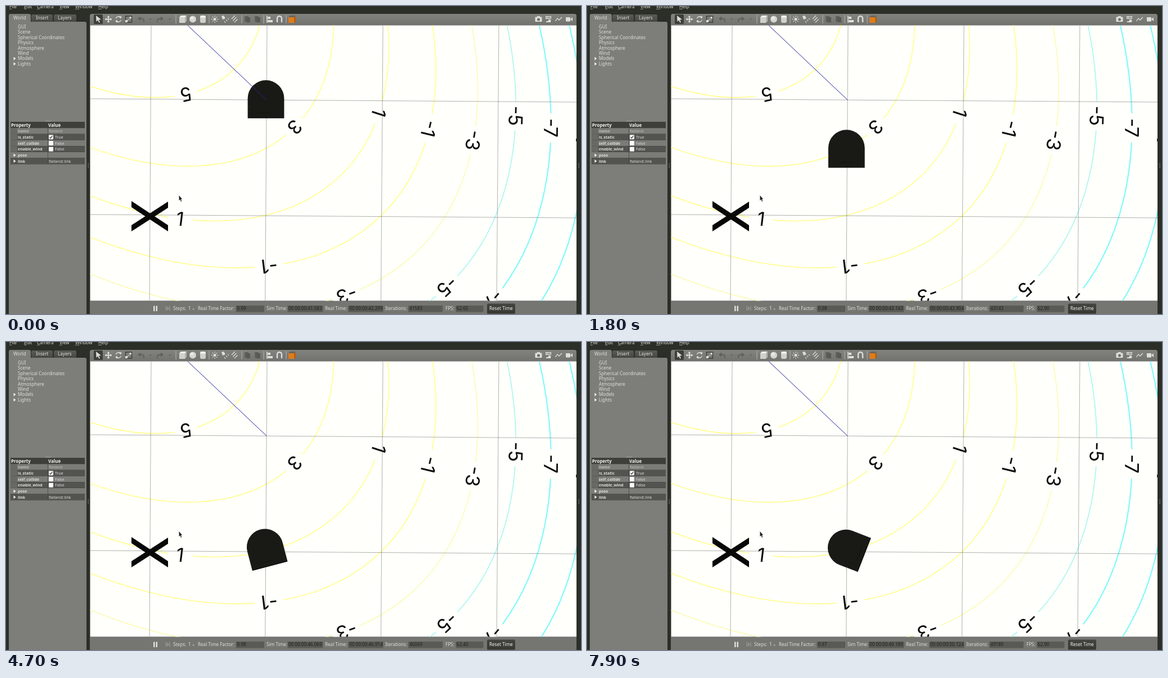
These frames come from a looping animation (1022 px wide and 548 px high, 8 s). An HTML page with a canvas:

```html
<!DOCTYPE html>
<html>
<head>
<meta charset="utf-8">
<style>
html, body { margin: 0; width: 100%; height: 100%; overflow: hidden; background: #2c2e28; }
canvas { display: block; }
</style>
</head>
<body>
<canvas id="stage" width="1022" height="548"></canvas>
<script>
const W = 1022, H = 548;
const screen = document.getElementById('stage').getContext('2d');
const backdrop = document.createElement('canvas');
backdrop.width = W;
backdrop.height = H;
let g = backdrop.getContext('2d');

const DARK = '#2c2e28', LIGHT = '#dededa', DIM = '#5f5f5b', GROUND = '#fffffb';

function rect(x, y, w, h, color, radius = 0) {
  g.fillStyle = color;
  g.beginPath();
  g.roundRect(x, y, w, h, radius);
  g.fill();
}

// Text is placed by its vertical middle.
function text(str, x, y, color = LIGHT, size = 8.1, weight = 400, family = 'Noto Sans') {
  g.font = `${weight} ${size}px "${family}", sans-serif`;
  g.fillStyle = color;
  g.fillText(str, x, y + size * 0.36);
}

function trace(points) {
  g.beginPath();
  for (let i = 0; i < points.length; i += 2) g.lineTo(points[i], points[i + 1]);
}

function line(points, color, width = 1) {
  g.strokeStyle = color;
  g.lineWidth = width;
  trace(points);
  g.stroke();
}

function poly(points, color) {
  g.fillStyle = color;
  trace(points);
  g.fill();
}

function circle(x, y, r, color) {
  g.fillStyle = color;
  g.beginPath();
  g.arc(x, y, r, 0, Math.PI * 2);
  g.fill();
}

function fade(y0, y1, top, bottom) {
  const grad = g.createLinearGradient(0, y0, 0, y1);
  grad.addColorStop(0, top);
  grad.addColorStop(1, bottom);
  return grad;
}

function turned(x, y, angle, draw) {
  g.save();
  g.translate(x, y);
  g.rotate(angle);
  draw();
  g.restore();
}

function drawMenuAndTabs() {
  rect(0, 0, W, H, DARK);
  [['File', 6], ['Edit', 32], ['Camera', 55], ['View', 95], ['Window', 123], ['Help', 164]].forEach(([name, x]) => {
    text(name, x, 1);
    rect(x, 5, g.measureText(name[0]).width, 0.7, '#bdbdb8');
  });
  rect(45, 15, 38, 13, fade(15, 28, '#5b5b57', '#454541'), [3, 3, 0, 0]);
  rect(85, 15, 40, 13, fade(15, 28, '#5b5b57', '#454541'), [3, 3, 0, 0]);
  rect(5, 14, 39, 16, '#7d7d79', [3, 3, 0, 0]);
  rect(5, 28, 138, 520, '#7d7d79', [0, 3, 0, 0]);
  text('World', 13, 21.5);
  text('Insert', 53, 21.5);
  text('Layers', 92, 21.5);
}

const expander = y => poly([13.5, y - 3, 17.5, y, 13.5, y + 3], '#f0f0ec');

function drawTree() {
  ['GUI', 'Scene', 'Spherical Coordinates', 'Physics', 'Atmosphere', 'Wind', 'Models', 'Lights'].forEach((name, i) => {
    const y = 37 + i * 9.43;
    text(name, 21, y);
    if (i > 5) expander(y);
  });
}

function drawProperties() {
  rect(70, 204.5, 10, 1, '#a5a5a0');
  rect(8, 206, 132, 75.5, '#3e3e3a');
  text('Property', 9, 211.8, '#f2f2ee', 8, 700);
  text('Value', 75, 211.8, '#f2f2ee', 8, 700);
  const rows = [['name', 'flatland'], ['is_static', 'True'], ['self_collide', 'False'],
    ['enable_wind', 'False'], ['pose', ''], ['link', 'flatland::link']];
  rows.forEach(([name, value], i) => {
    const y = 217.3 + i * 10.7, mid = y + 5.3;
    const color = i ? LIGHT : '#bdbdb8';
    rect(8, y, 132, 10.2, i % 2 ? '#535350' : '#7b7b77');
    if (i < 4) rect(8, y, 12, 10.2, '#686864');
    rect(74, y, 0.8, 10.2, '#42423e');
    text(name, 21, mid, color, 7, 700);
    if (i > 0 && i < 4) {
      rect(76, mid - 4, 8, 8, '#fafaf8', 1);
      if (i === 1) line([77.5, mid, 79.3, mid + 2, 82.5, mid - 2.5], '#333', 1.2);
      text(value, 87, mid, color, 7);
    } else {
      text(value, 76, mid, color, 6.8);
    }
    if (i > 3) expander(mid);
  });
}

function drawBox(x, front, top, side) {
  rect(x - 6, 20, 10, 10, front);
  poly([x - 6, 20, x - 3, 17, x + 7, 17, x + 4, 20], top);
  poly([x + 4, 20, x + 7, 17, x + 7, 27, x + 4, 30], side);
}

function drawToolbar() {
  const y = 23.5, icon = LIGHT;
  rect(149, 14, 865, 21, fade(14, 34, '#83837f', '#71716d'), [4, 4, 0, 0]);
  rect(156, 15, 16, 17, '#3d3d39', 2);
  poly([160, 17, 169, 24, 165, 24.5, 167, 29, 165.2, 29.7, 163.3, 25.3, 160.5, 28], icon);

  for (let i = 0; i < 4; i++) {
    turned(182, y, i * Math.PI / 2, () => {
      rect(0, -0.9, 4, 1.8, icon);
      poly([6.5, 0, 3.5, -2.5, 3.5, 2.5], icon);
    });
  }
  for (const angle of [0, Math.PI]) {
    turned(200, y, angle, () => {
      g.strokeStyle = icon;
      g.lineWidth = 1.4;
      g.beginPath();
      g.arc(0, 0, 4.7, 0.3, 2.7);
      g.stroke();
      poly([2, -6.5, 6, -3.5, 2, -1.5], icon);
    });
  }
  g.strokeRect(212.5, 18, 11, 11);
  line([214, 28, 222, 20], icon);
  poly([223, 19, 218.5, 19.5, 222.5, 23.5], icon);
  rect(212, 25, 4, 4, icon);

  for (const [x, dir] of [[240, 1], [274, -1]]) {
    g.save();
    g.translate(x, y);
    g.scale(dir, 1);
    poly([-6, -1, -1, -5, -1, 3], DIM);
    line([-2, -1, 2, -1, 5, 1, 5, 5], DIM, 2);
    g.restore();
    poly([x + 15, 22.5, x + 19, 22.5, x + 17, 25], DIM);
  }
  for (const x of [302, 361, 419, 458, 498]) rect(x - 0.5, 16, 1, 15, '#b4b4af');

  drawBox(314, '#d0d0cc', '#efefec', '#b4b4b0');
  circle(332, y, 6, '#d5d5d1');
  circle(330.5, 21.5, 3, '#e8e8e4');
  rect(345, 18, 10, 12, '#d0d0cc', 3);
  rect(345, 17, 10, 4, '#efefec', 2);

  circle(371, y, 2.5, icon);
  for (let i = 0; i < 8; i++) turned(371, y, i * Math.PI / 4, () => rect(4, -0.6, 2.2, 1.2, icon));
  poly([383, 18, 387, 17, 390, 22, 385, 24], icon);
  for (const d of [0, 3, 6]) line([388 + d, 27 - d * 0.8, 390 + d, 30 - d], icon, 1.1);
  for (const d of [0, 4, 8]) line([401 + d * 0.6, 23 + d * 0.8, 407 + d * 0.6, 17 + d * 0.8], icon, 1.3);

  for (const x of [424, 442]) {
    rect(x, 18, 7, 10, DIM);
    rect(x + 3, 20, 7, 9, '#585854');
  }
  rect(463, 17, 1.5, 13, icon);
  rect(465, 19, 5, 4, icon);
  rect(465, 25, 9, 4, icon);
  g.strokeStyle = icon;
  g.lineWidth = 2.4;
  g.beginPath();
  g.moveTo(482, 29);
  g.arc(486, 22, 4, Math.PI, 0);
  g.lineTo(490, 29);
  g.stroke();
  drawBox(508, '#dc7d1c', '#66645f', '#b75f0e');

  rect(940.5, 19.5, 12, 8.5, icon, 1);
  rect(944, 18, 5, 3, icon);
  circle(946.5, 24, 2.5, '#6e6e6a');
  rect(959, 18, 10, 5, icon);
  text('LOG', 960, 20.5, '#555', 4, 700);
  line([960, 28, 968, 28], icon, 2);
  circle(966, 26.5, 2.5, icon);
  line([976.5, 27, 980, 22, 983, 25, 988, 20], icon, 1.3);
  rect(995, 20, 8, 7.5, icon, 1);
  poly([1003, 23.5, 1007, 20, 1007, 27], icon);
}

// Contours of a tilted paraboloid: concentric ellipses, squared radius linear in level.
const bowl = { x: 90, y: -205, xx: 325.4, xy: 153.7, yy: 285.1 };
const bowlRadius = level => Math.sqrt(3.29 + (1 - level) / 2);

function contour(level, color, width) {
  g.save();
  g.transform(bowl.xx, bowl.xy, 0, bowl.yy, bowl.x, bowl.y);
  g.beginPath();
  g.arc(0, 0, bowlRadius(level), -0.6, 1.6);
  g.restore();
  g.strokeStyle = color;
  g.lineWidth = width;
  g.stroke();
}

// Label centred on its contour, following the tangent, with a gap in the line.
function contourLabel(level, phase) {
  const r = bowlRadius(level), c = Math.cos(phase), s = Math.sin(phase);
  const x = bowl.x + r * bowl.xx * c;
  const y = bowl.y + r * (bowl.xy * c + bowl.yy * s);
  const angle = Math.atan2(bowl.yy * c - bowl.xy * s, -bowl.xx * s);
  const gap = level < 0 ? 52 : 42;
  turned(x, y, angle < 0 ? angle + Math.PI : angle, () => {
    rect(-gap / 2, -7, gap, 14, GROUND);
    g.textAlign = 'center';
    text(level, 0, 0, '#0a0a0a', 34, 400, 'Inter');
  });
}

function drawGround() {
  g.save();
  g.beginPath();
  g.rect(149.5, 34.5, 864.5, 490);
  g.clip();
  rect(149, 34, 866, 492, GROUND);

  for (let level = 5; level >= -9; level -= 2) {
    const color = level > -3 ? '#ffff8c' : level > -5 ? '#fbfbb4' : level > -7 ? '#a6f6f2' : '#7dfafa';
    contour(level, color, level > -7 ? 1.6 : 2.1);
  }
  const phases = { 5: [0.9], 3: [0.536], 1: [0.242, 1.19], '-1': [0.188, 0.975],
    '-3': [0.144, 0.811], '-5': [0.021, 0.554], '-7': [0.009, 0.488] };
  for (const level in phases) phases[level].forEach(phase => contourLabel(+level, phase));
  rect(1013, 236, 1, 5, '#222');

  const grid = 'rgba(90,90,90,.48)';
  for (let i = 0; i < 4; i++) line([258 + i * 206, 34, 255 + i * 205.7, 525], grid);
  for (const y of [165, 371]) line([149, y, 1014, y + 6], grid);

  poly([223, 347, 288, 390, 288, 401, 223, 358], '#080808');
  poly([288, 348, 288, 359, 223, 401, 223, 390], '#080808');
  poly([307.5, 337, 307.5, 346, 309.4, 344.3, 311, 348, 312.3, 347.4, 310.8, 344, 313, 343.5], '#222');
  g.restore();
}

function drawStatusBar() {
  rect(149, 525, 865, 23, '#757571');
  for (const x of [262, 266.5]) rect(x, 533.5, 2.5, 9.5, LIGHT);
  for (const x of [283.5, 290]) rect(x, 534, 1.5, 8, '#94948f');
  poly([286, 534, 290, 538, 286, 542], '#94948f');
  text('Steps:', 297, 538.5);
  text('1', 324, 538.5);
  poly([331, 538.5, 335, 538.5, 333, 541], '#b5b5b0');
  [['Real Time Factor:', 341, 409, 50], ['Sim Time:', 463, 500.5, 63], ['Real Time:', 567, 608.5, 62],
    ['Iterations:', 674, 715, 61], ['FPS:', 781, 799.5, 49]].forEach(([name, x, fieldX, fieldW]) => {
    text(name, x, 538.5);
    rect(fieldX, 533, fieldW, 11.5, '#595955', 1);
  });
  rect(855, 529.5, 50, 18, fade(529, 548, '#444440', '#363632'), 2);
  text('Reset Time', 859, 538.5, '#f4f4f0');
  for (const x of [145.5, 1017.5]) for (const y of [280, 283, 286]) rect(x, y, 1.5, 1.5, '#85857f');
}

drawMenuAndTabs();
drawTree();
drawProperties();
drawToolbar();
drawStatusBar();
drawGround();
g = screen;

// Drives down the view with soft start and stop, then turns at a constant rate.
function drawRobot(t) {
  const p = Math.min(1, Math.max(0, (t - 100) / 3750));
  const drive = 200 * (p - 0.28 * Math.sin(2 * Math.PI * p) / (2 * Math.PI));
  const degrees = Math.max(0, t - 3830) * 0.0169;
  turned(462 - drive * 0.0085, 164.5 + drive + degrees * 0.025, -degrees * Math.PI / 180, () => {
    g.fillStyle = '#191a15';
    g.beginPath();
    g.arc(0, 0, 32.4, Math.PI, 0);
    g.lineTo(32.4, 35);
    g.lineTo(-32.4, 35);
    g.fill();
    for (const x of [-32.4, 31.2]) rect(x, 14, 1.2, 1.5, '#55564f');
    line([-13, 26, 10, 26], '#11120e', 0.8);
    line([-32, 34.4, 32, 34.4], '#0e0e0b', 1.2);
  });
}

function drawCounters(t) {
  const tick = Math.floor(Math.max(0, t - 100) / 200);
  const sim = 41.583 + tick * 0.19503, real = 42.299 + tick * 0.20064;
  const put = (str, x) => text(str, x, 538.5, '#20201d');
  put((0.986 - tick * 0.0004).toFixed(2), 410.5);
  put('00 00:00:' + sim.toFixed(3), 502);
  put('00 00:00:' + real.toFixed(3), 610);
  put(Math.round(sim * 1000), 717);
  put((62.65 + 0.25 * Math.sin(tick * 0.2)).toFixed(2), 801);
}

function frame(now) {
  const step = Math.floor(now % 8000 / 100) * 100;
  const t = step < 200 ? 0 : step;
  g.drawImage(backdrop, 0, 0);
  drawRobot(t);
  line([323, 34.5, 463, 167], '#22229c');
  drawCounters(t);
  requestAnimationFrame(frame);
}
requestAnimationFrame(frame);
</script>
</body>
</html>
```
